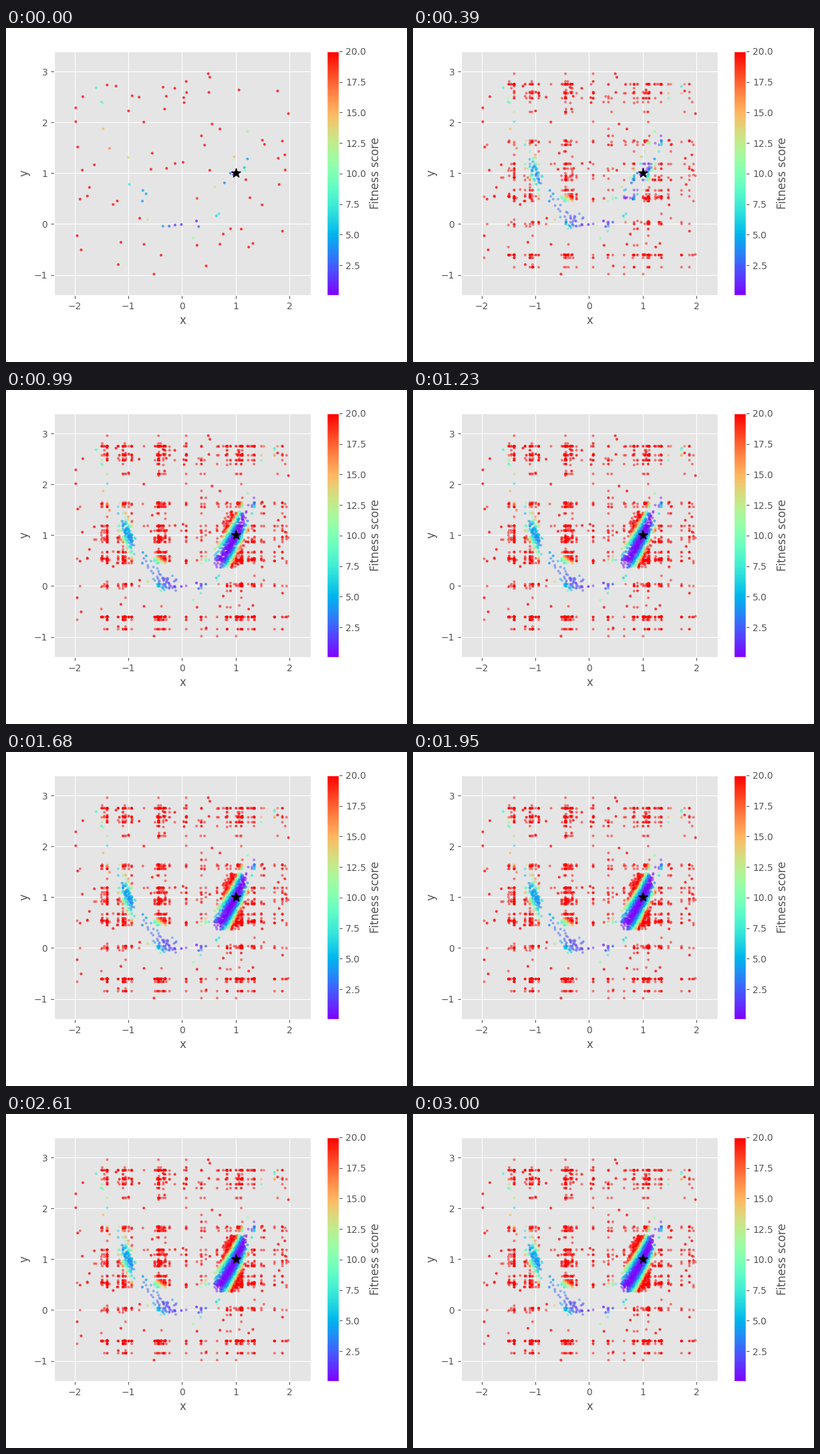
A matplotlib script that plays this animation: 600x500 px, repeating every 3030 ms.

```python
import numpy as np
import matplotlib.pyplot as plt
from matplotlib.animation import FuncAnimation
from matplotlib.cm import ScalarMappable
from matplotlib.colors import Normalize

FRAMES, INTERVAL = 101, 30
rng = np.random.default_rng(7)


def fitness(p):
    x, y = p.T
    return (1 - x) ** 2 + 100 * (y - x**2) ** 2


def gene_pool(clumps):
    """Inherited values in clumps of (centre, spread, count), some favoured."""
    genes = np.concatenate([rng.normal(c, s, n) for c, s, n in clumps])
    weight = 0.4 + rng.exponential(1, len(genes))
    return genes, weight / weight.sum()


def inherit(pool, n):
    genes, p = pool
    return rng.choice(genes, n, p=p)


def valley(x, spread):
    """Points scattered around the valley floor y = x^2."""
    return np.column_stack([x, x**2 + rng.normal(0, 1, len(x)) * spread])


def born(points, start, end):
    return points, rng.uniform(start, end, len(points))


# First generation: a few good starters, the rest anywhere
starters = [
    (-1.6, 2.68), (-1.5, 2.4), (-1.47, 1.87), (-1.35, 1.49), (-1, 1.31),
    (-0.73, 0.66), (-0.74, 0.45), (-0.13, -0.02), (0.27, 0.06), (0.31, -0.05),
    (0.64, 0.16), (0.61, 0.73), (0.79, 0.81), (0.9, 1), (0.96, 0.97),
    (1.16, 1.11), (1.22, 1.28), (1.22, 1.82),
]
first = np.vstack([starters, rng.uniform((-2, -1), (2, 3), (80, 2))])

# Crossover keeps recombining a limited set of x and y values
x_pool = gene_pool([
    (-1.46, 0.04, 4), (-1.05, 0.08, 8), (-0.38, 0.11, 13), (0.08, 0.01, 1),
    (0.36, 0.07, 3), (0.93, 0.2, 18), (1.42, 0.07, 5), (1.87, 0.09, 3),
])
y_pool = gene_pool([
    (2.75, 0.06, 3), (2.44, 0.09, 6), (1.6, 0.16, 5), (0.95, 0.15, 15),
    (0.54, 0.08, 13), (0.01, 0.03, 4), (-0.6, 0.04, 3), (-0.84, 0.01, 1),
])
n_mix, n_stray = 1700, 70
mixed = np.column_stack([inherit(x_pool, n_mix), inherit(y_pool, n_mix)])
stray_x = np.column_stack([rng.choice(first[:, 0], n_stray), inherit(y_pool, n_stray)])
stray_y = np.column_stack([inherit(x_pool, n_stray), rng.choice(first[:, 1], n_stray)])

# Local optima, then the crowd around the best point
left = valley(rng.normal(-1, 0.05, 100), 0.16)
low = valley(rng.normal(-0.4, 0.16, 40), 0.08)

u = rng.random(2300)
best = valley(rng.normal(0.93, 0.13, len(u)), 0.34 - 0.08 * u)
x, y = best.T
ok = (x > 0.59) & (x < 1.21) & (y > 0.36) & (y < 1.47)

# The first generation is plotted twice, so it looks denser
groups = [
    born(first, 0, 0), born(first, 0, 0),
    born(stray_x, 0, 12), born(stray_y, 0, 12), born(mixed, 1, 24),
    born(left, 4, 25), born(low, 2, 22),
    (best[ok], 17 + 83 * u[ok] ** 1.6),
]
points = np.vstack([g[0] for g in groups])
birth = np.concatenate([g[1] for g in groups])
order = np.argsort(birth, kind="stable")
points, birth = points[order], birth[order]

plt.style.use("ggplot")
fig, ax = plt.subplots(figsize=(6, 5), dpi=100)
fig.subplots_adjust(left=0.12, right=0.92, bottom=0.2, top=0.93)
norm = Normalize(0.04, 20)
bar = fig.colorbar(ScalarMappable(norm, "rainbow"), ax=ax)
bar.set_label("Fitness score")
ax.set(xlim=(-2.3825, 2.3975), ylim=(-1.4, 3.395), xlabel="x", ylabel="y")

colors = plt.get_cmap("rainbow")(norm(np.minimum(fitness(points), 20)))
colors[:, 3] = 0.5
dots = ax.scatter([], [], s=8, linewidths=0)
ax.scatter(1, 1, s=100, marker="*", c="black", linewidths=1, zorder=3)


def draw(i):
    n = np.searchsorted(birth, i, side="right")
    dots.set_offsets(points[:n])
    dots.set_facecolors(colors[:n])
    return (dots,)


anim = FuncAnimation(fig, draw, frames=FRAMES, interval=INTERVAL,
                     repeat=True, repeat_delay=0)
plt.show()
```
